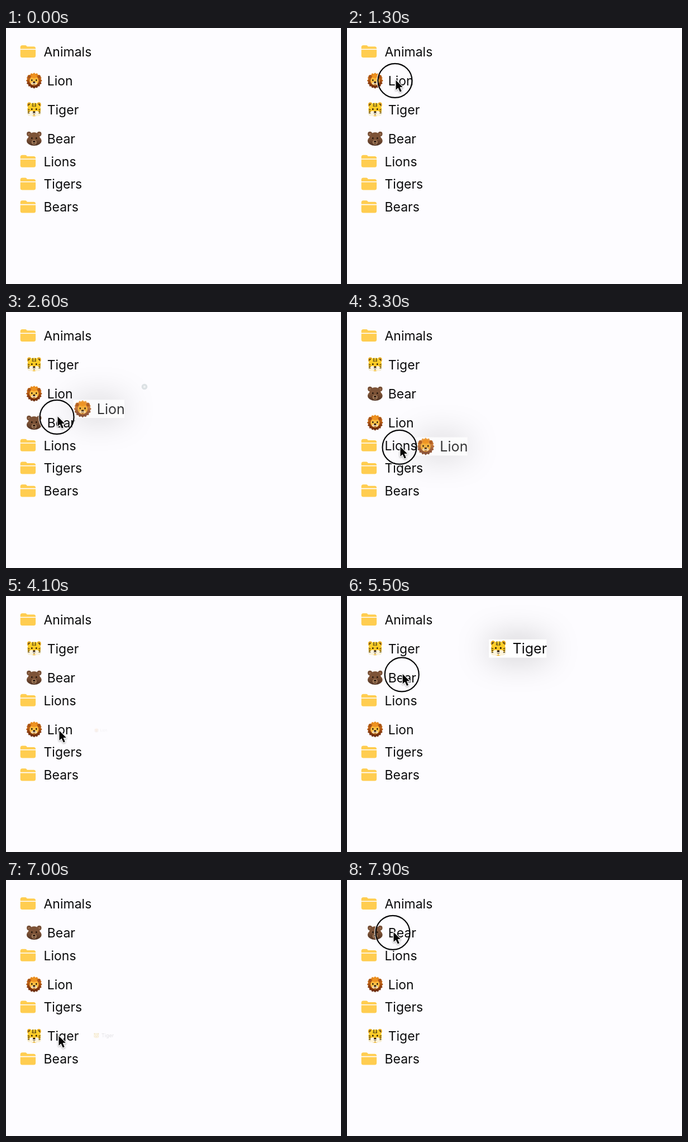
An HTML page with a canvas for the animation above (8 s loop, 600 px wide and 459 px high).

```html
<!DOCTYPE html>
<html lang="en">
<head>
<meta charset="utf-8">
<title>Drag and drop list</title>
<style>
html, body { margin: 0; width: 100%; height: 100%; overflow: hidden; background: #fdfcff; }
canvas { display: block; width: 600px; height: 459px; }
</style>
</head>
<body>
<canvas id="stage"></canvas>
<script>
const W = 600, H = 459, LOOP = 8000, TAU = Math.PI * 2;
const FONT = '23px Inter, "Open Sans", sans-serif';
const canvas = document.getElementById('stage');
const ctx = canvas.getContext('2d');
const dpr = window.devicePixelRatio || 1;
canvas.width = W * dpr;
canvas.height = H * dpr;

const clamp = v => Math.max(0, Math.min(1, v));
const mix = (a, b, k) => a + (b - a) * k;
const ease = k => k * k * (3 - 2 * k);
const progress = (t, start, length) => clamp((t - start) / length);

// ---- timeline ----
const ROW = 94;
const DRAGS = [
  { name: 'Lion', lift: 1350, go: 1965, drop: 3750, x: 94, y: 242 },
  { name: 'Tiger', lift: 5150, go: 5250, drop: 6700, x: 93, y: 280 }
];
const [first, second] = DRAGS;
const LAST_PRESS = 7800;

// Pointer trips: drags run at constant speed, free moves are eased.
const TRIPS = [
  { go: 250, length: 750, x: 86, y: ROW },
  { ...first, length: 1000, steady: true },
  { go: 4550, length: 350, x: 100, y: ROW },
  { ...second, length: 1000, steady: true },
  { go: 7150, length: 630, x: 82, y: ROW }
];

// Each edit moves one name to a new index.
const EDITS = [
  { time: 2250, name: 'Lion', index: 2 },
  { time: 2680, name: 'Lion', index: 3 },
  { time: first.drop, name: 'Lion', index: 4 },
  { time: 5780, name: 'Tiger', index: 2 },
  { time: second.drop, name: 'Tiger', index: 5 }
];

function pointerAt(t) {
  let x = 20, y = 312;
  for (const trip of TRIPS) {
    const p = progress(t, trip.go, trip.length), k = trip.steady ? p : ease(p);
    x = mix(x, trip.x, k);
    y = mix(y, trip.y, k);
  }
  return { x, y };
}

const isPressed = t => t >= LAST_PRESS ||
  DRAGS.some(d => t >= d.lift - 250 && t < d.drop - 40);

function layout(names) {
  const pos = {};
  let y = 1.5;
  for (const name of names) pos[name] = y += icons[name] ? 52 : 40.8;
  return pos;
}

function rowsAt(t) {
  const names = 'Animals Lion Tiger Bear Lions Tigers Bears'.split(' ');
  let pos = layout(names);
  for (const { time, name, index } of EDITS) {
    if (t < time) break;
    names.splice(names.indexOf(name), 1);
    names.splice(index, 0, name);
    const next = layout(names), k = ease(progress(t, time, 260));
    for (const n of names) pos[n] = mix(pos[n], next[n], k);
  }
  return pos;
}

// ---- shapes ----
function oval(x, y, rx, ry, fill) {
  ctx.beginPath();
  ctx.ellipse(x, y, rx, ry, 0, 0, TAU);
  ctx.fillStyle = fill;
  ctx.fill();
}

function pair(x, y, rx, ry, fill) {
  oval(-x, y, rx, ry, fill);
  oval(x, y, rx, ry, fill);
}

function trace(points) {
  ctx.beginPath();
  points.forEach(p => ctx.lineTo(...p));
  ctx.closePath();
}

function shade(r, ...colors) {
  const g = ctx.createLinearGradient(0, -r, 0, r);
  colors.forEach((c, i) => g.addColorStop(i / (colors.length - 1), c));
  return g;
}

function face(eye, nose) {
  pair(4, -0.8, 1.3, 1.6, '#1d1209');
  oval(0, nose, 2.3, 1.5, '#23130c');
  ctx.beginPath();
  ctx.arc(0, nose + 1.6, 2.2, 0.4, Math.PI - 0.4);
  ctx.strokeStyle = eye;
  ctx.lineWidth = 0.9;
  ctx.stroke();
}

const icons = {
  Lion() {
    const tips = Array.from({ length: 32 }, (_, i) => {
      const a = i * TAU / 32, r = i % 2 ? 12.4 : 14.4;
      return [Math.sin(a) * r, -Math.cos(a) * r];
    });
    trace(tips);
    ctx.fillStyle = shade(14, '#ef9420', '#cf6c14', '#8a3c10', '#67290c');
    ctx.fill();
    pair(9, -6.8, 2.9, 3, '#a8561a');
    oval(0, 0.3, 8.2, 8.4, shade(9, '#f9a125', '#ffc548', '#ef9d2c'));
    oval(0, -8, 5, 3.6, '#ee9220');
    pair(2.2, 5, 3, 2.5, '#fbe3b4');
    face('#5a2a12', 3);
  },
  Tiger() {
    pair(8.6, -8.6, 3.8, 4.4, '#e9ad22');
    pair(8.8, -8.3, 2, 2.5, '#5d451c');
    pair(7.4, 6, 5.2, 5.2, '#f5ecd2');
    oval(0, 0, 11.8, 12, shade(12, '#ffd62f', '#fdc823', '#e9b02b'));
    pair(4.4, 7, 5, 4.6, '#fdf4dc');
    ctx.beginPath();
    for (const side of [-1, 1]) {
      for (let i = 0; i < 3; i++) {
        ctx.moveTo(side * (0.6 + i * 0.4), -5.5 - i * 2.4);
        ctx.lineTo(side * (3.8 - i * 0.3), -6.8 - i * 2.2);
        ctx.moveTo(side * 8.2, 0.5 + i * 3);
        ctx.lineTo(side * 11.2, -0.8 + i * 3.2);
      }
    }
    ctx.strokeStyle = '#33280f';
    ctx.lineWidth = 1.2;
    ctx.stroke();
    face('#3b2a18', 4.4);
  },
  Bear() {
    pair(9.2, -8.4, 4, 4.2, '#70482f');
    pair(9.1, -7.8, 2.2, 2.4, '#94684a');
    oval(0, -1, 10.6, 10.4, '#7d5337');
    oval(0, 4, 13.3, 8.8, shade(13, '#7d5337', '#7d5337', '#4c2f20'));
    oval(0, 6.6, 4.6, 4.4, '#a57c5a');
    face('#1b1210', 5.2);
  }
};

function folder(y) {
  ctx.save();
  ctx.translate(25.7, y - 11.4);
  ctx.fillStyle = '#ffcd50';
  ctx.beginPath();
  ctx.roundRect(0, 0, 12, 6.5, [3.5, 3.5, 0, 0]);
  ctx.roundRect(0, 2.4, 27.4, 4.1, [0, 3.5, 0, 0]);
  ctx.roundRect(0, 8.1, 27.4, 14, [0, 0, 3.5, 3.5]);
  ctx.fill();
  ctx.restore();
}

function label(text, x, y) {
  ctx.font = FONT;
  ctx.fillStyle = '#0b0b0c';
  ctx.fillText(text, x, y + 8.4);
}

function animal(name, left, y) {
  ctx.save();
  ctx.translate(left + 17.3, y);
  icons[name]();
  ctx.restore();
  label(name, left + 40.7, y);
}

function drawList(t) {
  for (const [name, y] of Object.entries(rowsAt(t))) {
    if (icons[name]) {
      animal(name, 33, y);
    } else {
      folder(y);
      label(name, 67.5, y);
    }
  }
}

// The lifted row waits mid-stage, then trails the pointer and shrinks on drop.
function drawPreview({ name, lift, go, drop }, t) {
  const pop = ease(progress(t, lift, 280)), out = progress(t, drop, 420);
  if (!pop || out === 1) return;
  const near = ease(progress(t, go + 230, 400));
  const lag = pointerAt(Math.min(t, drop) - 90);
  const left = mix(253, lag.x + 28, near), y = mix(ROW, lag.y - 1, near);
  ctx.font = FONT;
  const w = 41 + ctx.measureText(name).width;
  const scale = mix(1, 1.09, pop) * mix(1, 0.2, ease(out));

  ctx.save();
  ctx.globalAlpha = pop * mix(1, 0.82, near) * (1 - out) ** 1.6;
  ctx.translate(left + w * 0.545, y);
  ctx.scale(scale, scale);
  ctx.translate(-w / 2, 0);
  ctx.shadowColor = `rgba(0,0,0,${0.25 * (1 - out)})`;
  ctx.shadowBlur = 60 * dpr;
  ctx.fillStyle = '#fff';
  ctx.fillRect(2, -15, w - 3, 30);
  ctx.shadowColor = 'transparent';
  animal(name, 0, 0);
  ctx.restore();
}

// Small badge that flashes beside the moving preview.
function drawBadge(t) {
  ctx.save();
  ctx.globalAlpha = clamp(1 - Math.abs(t - 2590) / 110);
  oval(248, 134, 5.3, 5.3, '#d9dee1');
  oval(248, 134, 2, 2, '#f3f5f6');
  ctx.restore();
}

function ring(r, width, color) {
  ctx.beginPath();
  ctx.arc(0, 0, r, 0, TAU);
  ctx.strokeStyle = color;
  ctx.lineWidth = width;
  ctx.stroke();
}

function drawPointer(t) {
  if (t < TRIPS[0].go) return;
  const { x, y } = pointerAt(t);
  ctx.save();
  ctx.translate(x, y + 0.4);
  if (isPressed(t)) {
    ring(32, 2, 'rgba(255,255,255,.7)');
    ring(30.5, 2.2, '#08080a');
  }
  ctx.translate(1.5, -1);
  ctx.scale(1.06, 1.06);
  trace([[0, 0], [0, 16.6], [3.8, 13], [6.9, 20], [9.7, 18.8], [6.7, 12], [11.8, 12]]);
  ctx.strokeStyle = '#fff';
  ctx.lineWidth = 2.4;
  ctx.lineJoin = 'round';
  ctx.shadowColor = 'rgba(0,0,0,.35)';
  ctx.shadowBlur = 3 * dpr;
  ctx.shadowOffsetY = dpr;
  ctx.stroke();
  ctx.shadowColor = 'transparent';
  ctx.fillStyle = '#050505';
  ctx.fill();
  ctx.restore();
}

function draw(t) {
  ctx.setTransform(dpr, 0, 0, dpr, 0, 0);
  ctx.fillStyle = '#fdfcff';
  ctx.fillRect(0, 0, W, H);
  drawList(t);
  DRAGS.forEach(d => drawPreview(d, t));
  drawBadge(t);
  drawPointer(t);
}

let start;
function tick(now) {
  start ??= now;
  draw((now - start) % LOOP);
  requestAnimationFrame(tick);
}
requestAnimationFrame(tick);
</script>
</body>
</html>
```
